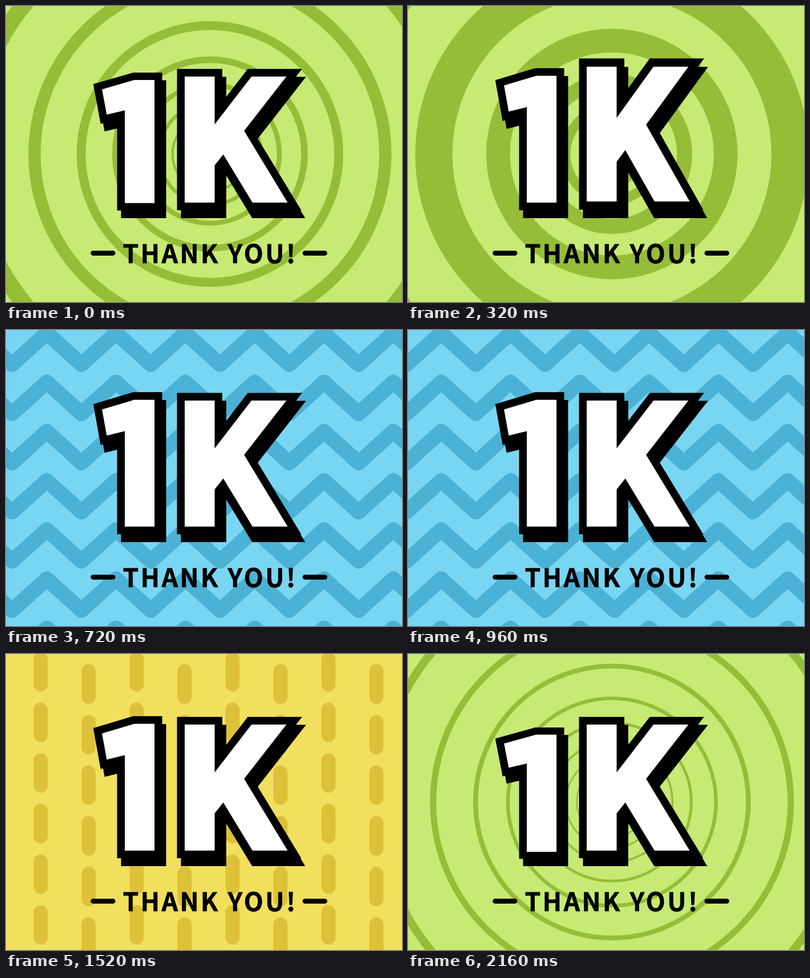
Write an HTML page that moves like this. It is 800x600 px and loops after 2.24 s.

```html
<!DOCTYPE html>
<html lang="en">
<head>
<meta charset="utf-8">
<title>1K thank you</title>
<style>
  html, body { margin: 0; width: 100%; height: 100%; overflow: hidden; }
  svg { display: block; width: 100vw; height: 100vh; }
  .glyph { stroke: #000; stroke-width: 31; stroke-miterlimit: 6; paint-order: stroke; }
  .face { fill: #fff; }
  .thanks {
    font: 700 51px "Noto Sans CJK JP", "Noto Sans CJK", Roboto, sans-serif;
    letter-spacing: 4px; text-anchor: middle; stroke: #000; stroke-width: .8;
  }
</style>
</head>
<body>
<svg viewBox="0 0 800 600">
  <defs>
    <path id="one" d="M194 161 259 141.500H300V398.500H240V205L203.500 214Z"/>
    <path id="kay" d="M361 143H421.500V240L496 143H566.500L481 253 569 398.500H498L439 301 421.500 323V398.500H361Z"/>
  </defs>

  <g id="green">
    <rect width="800" height="600" fill="#c6ea74"/>
    <g id="rings" fill="none" stroke="#95bd37"></g>
  </g>
  <g id="blue">
    <rect width="800" height="600" fill="#79d6f3"/>
    <g id="waves" fill="none" stroke="#4bb2d5" stroke-width="30.6" stroke-linejoin="round"></g>
  </g>
  <g id="yellow">
    <rect width="800" height="600" fill="#f1df5e"/>
    <g stroke="#ddc138" stroke-width="28.5" stroke-linecap="round" stroke-dasharray="51.500 51.100">
      <g id="even"></g>
      <g id="odd"></g>
    </g>
  </g>

  <g id="digit">
    <use href="#one" class="glyph" x="8" y="16"/>
    <use href="#one" class="glyph face"/>
  </g>
  <g id="letter">
    <use href="#kay" class="glyph" x="8" y="16"/>
    <use href="#kay" class="glyph face"/>
  </g>

  <path d="M176 501H216M604 501H644" stroke="#000" stroke-width="10" stroke-linecap="round"/>
  <text class="thanks" x="412.400" y="520.500">THANK YOU!</text>
</svg>

<script>
const STEP = 80, FRAMES = 28;
const GREEN_START = 26, BLUE_START = 7, YELLOW_START = 17;
const WAVE = 140, DASH = 102.6, FLOOR = 430;
const BOUNCE = [0.924, 0.9706, 1.03, 1.07, 1.03];

const el = id => document.getElementById(id);
const mod = (a, n) => ((a % n) + n) % n;

function add(parent, tag, attrs = {}) {
  const node = document.createElementNS("http://www.w3.org/2000/svg", tag);
  for (const key in attrs) node.setAttribute(key, attrs[key]);
  parent.append(node);
  return node;
}

const rings = Array.from({ length: 13 }, () => add(el("rings"), "circle", { cx: 412, cy: 300 }));

for (let row = 0; row < 7; row++) {
  const top = 6.1 + row * 99.7;
  let d = "";
  for (let i = -2; i < 15; i++) d += `${i === -2 ? "M" : "L"}${i * 70} ${top + (i % 2 ? 63.6 : 0)}`;
  add(el("waves"), "path", { d });
}

for (let col = 0; col < 8; col++) {
  const x = 70 + col * 96.9;
  add(el(col % 2 ? "odd" : "even"), "line", { x1: x, x2: x, y1: 14.25, y2: 840 });
}

// Each ring is the previous one enlarged, stroke included.
function drawRings(age) {
  const base = 42.04 - 0.64 * age;
  const ratio = 1.26 + 0.051 * age;
  rings.forEach((ring, n) => {
    const r = base * ratio ** n;
    ring.setAttribute("r", r);
    ring.setAttribute("stroke-width", r * 0.0348 * age);
  });
}

function shift(id, x, y) {
  el(id).setAttribute("transform", `translate(${x} ${y})`);
}

function squash(id, frame, start) {
  const s = BOUNCE[mod(frame - start, FRAMES)] ?? 1;
  el(id).setAttribute("transform", `translate(0 ${FLOOR * (1 - s)}) scale(1 ${s})`);
}

function draw(frame) {
  const blue = frame >= BLUE_START && frame < YELLOW_START;
  const yellow = frame >= YELLOW_START && frame < GREEN_START;
  el("blue").style.display = blue ? "" : "none";
  el("yellow").style.display = yellow ? "" : "none";
  el("green").style.display = blue || yellow ? "none" : "";

  if (blue) {
    shift("waves", mod(46 - 51.8 * (frame - BLUE_START), WAVE), 0);
  } else if (yellow) {
    const slide = 6.2 * (frame - YELLOW_START);
    shift("even", 0, mod(111 - slide, DASH) - 2 * DASH);
    shift("odd", 0, mod(111 + slide, DASH) - 2 * DASH);
  } else {
    drawRings(mod(frame - GREEN_START, FRAMES));
  }
  squash("digit", frame, 27);
  squash("letter", frame, 1);
}

const begin = performance.now();
function tick() {
  draw(Math.floor((performance.now() - begin) / STEP) % FRAMES);
  requestAnimationFrame(tick);
}
tick();
</script>
</body>
</html>
```
